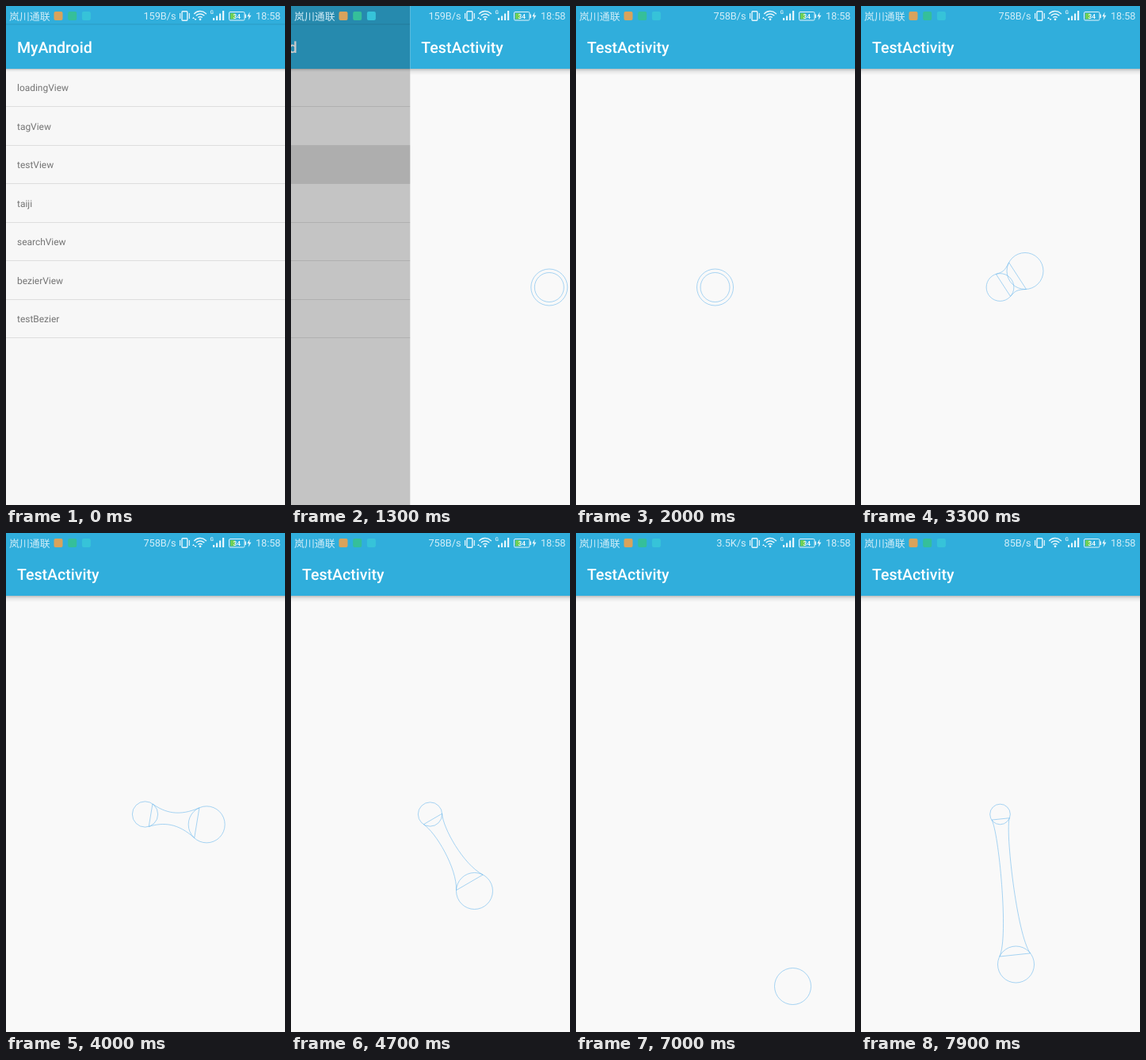
Write an HTML page with a canvas that moves like this. It is 352x628 px and loops after 8 s.

```html
<!DOCTYPE html>
<html lang="zh">
<head>
<meta charset="utf-8">
<title>Metaball drag</title>
<style>
  html, body { margin: 0; width: 100%; height: 100%; overflow: hidden; background: #f9f9f9; }
  canvas { display: block; width: 352px; height: 628px; }
</style>
</head>
<body>
<canvas id="stage"></canvas>
<script>
const W = 352, H = 628, LOOP = 8000, STEP = 100;
const canvas = document.getElementById('stage');
const ctx = canvas.getContext('2d');
const dpr = window.devicePixelRatio || 1;
canvas.width = W * dpr;
canvas.height = H * dpr;

const BLUE = '#30aedc', LINE = '#6db9ec', PALE = '#d3eef8', ICON = '#e6f6fc';
const SANS = 'Roboto, "Noto Sans", sans-serif';
const ITEMS = ['loadingView', 'tagView', 'testView', 'taiji', 'searchView', 'bezierView', 'testBezier'];
const ROW = 48.5, FIRST = 127;
const HOME = { x: 175.5, y: 354 }, BALL = 23, REACH = 220;

// Drag path: time, x, y
const PATH = [
  [2800, 175.5, 354], [3050, 187, 343], [3300, 207, 333.5], [3700, 245, 344],
  [4100, 252.5, 377], [4700, 231.5, 450.5], [5100, 241, 493], [5500, 270, 527],
  [6000, 302, 553], [6400, 308, 560], [7000, 273.5, 570.5], [7300, 241, 581],
  [7550, 217, 586], [7900, 195.5, 543]
];

function text(str, x, y, size, color, weight = 400, align = 'left', family = SANS) {
  ctx.font = `${weight} ${size}px ${family}`;
  ctx.textRendering = 'geometricPrecision';
  ctx.fillStyle = color;
  ctx.textAlign = align;
  ctx.fillText(str, x, y);
}

function box(x, y, w, h, color) {
  ctx.fillStyle = color;
  ctx.fillRect(x, y, w, h);
}

function roundBox(x, y, w, h, r) {
  ctx.beginPath();
  ctx.roundRect(x, y, w, h, r);
}

function ring(x, y, r) {
  ctx.beginPath();
  ctx.arc(x, y, r, 0, Math.PI * 2);
  ctx.stroke();
}

function polyline(points) {
  ctx.beginPath();
  points.forEach(([x, y]) => ctx.lineTo(x, y));
}

function header(title, depth) {
  box(0, 0, W, 79, BLUE);
  const shade = ctx.createLinearGradient(0, 79, 0, 79 + depth);
  shade.addColorStop(0, 'rgba(0,0,0,.24)');
  shade.addColorStop(0.4, 'rgba(0,0,0,.08)');
  shade.addColorStop(1, 'rgba(0,0,0,0)');
  box(0, 79, W, depth, shade);
  text(title, 14, 58.8, 19.55, '#fff', 500);
}

function listPage(t) {
  box(0, 0, W, H, '#f7f7f7');
  if (t >= 800) {
    const k = Math.min(1, (t - 700) / 400);
    ctx.save();
    ctx.beginPath();
    ctx.rect(0, FIRST + ROW, W, ROW);
    ctx.clip();
    box(0, FIRST + ROW, W, ROW, 'rgba(0,0,0,.04)');
    ctx.beginPath();
    ctx.arc(W / 2, FIRST + ROW * 1.5, 180 * k, 0, Math.PI * 2);
    ctx.fillStyle = 'rgba(0,0,0,.07)';
    ctx.fill();
    ctx.restore();
  }
  ITEMS.forEach((name, i) => {
    const y = FIRST + ROW * i;
    text(name, 14, y - 19.8, 11.95, '#747474');
    box(0, Math.round(y) - 1, W, 1, '#dedede');
  });
  header('MyAndroid', 4);
  box(0, 22, W, 2, 'rgba(0,0,0,.06)');
}

// Cubic Hermite through the drag path
function dragPoint(t) {
  if (t <= PATH[0][0]) return { ...HOME };
  let i = 0;
  while (i < PATH.length - 2 && t > PATH[i + 1][0]) i++;
  const a = PATH[i], b = PATH[i + 1], span = b[0] - a[0];
  const s = Math.min(1, (t - a[0]) / span);
  const slope = (j, c) => {
    const p = PATH[Math.max(0, j - 1)], q = PATH[Math.min(PATH.length - 1, j + 1)];
    return (q[c] - p[c]) / (q[0] - p[0]);
  };
  const at = c => {
    const s2 = s * s, s3 = s2 * s;
    return (2 * s3 - 3 * s2 + 1) * a[c] + (s3 - 2 * s2 + s) * span * slope(i, c)
         + (3 * s2 - 2 * s3) * b[c] + (s3 - s2) * span * slope(i + 1, c);
  };
  return { x: at(1), y: at(2) };
}

function neck(a, ra, b, rb, spread = 0.67, rate = 1.8) {
  const d = Math.hypot(b.x - a.x, b.y - a.y);
  if (d <= Math.abs(ra - rb)) return;
  let ua = 0, ub = 0;
  if (d < ra + rb) {
    ua = Math.acos((ra * ra + d * d - rb * rb) / (2 * ra * d));
    ub = Math.acos((rb * rb + d * d - ra * ra) / (2 * rb * d));
  }
  const dir = Math.atan2(b.y - a.y, b.x - a.x);
  const open = Math.acos((ra - rb) / d);
  const da = ua + (open - ua) * spread;
  const db = Math.PI - ub - (Math.PI - ub - open) * spread;
  const move = (p, ang, r) => ({ x: p.x + r * Math.cos(ang), y: p.y + r * Math.sin(ang) });
  const a1 = move(a, dir + da, ra), a2 = move(a, dir - da, ra);
  const b1 = move(b, dir + db, rb), b2 = move(b, dir - db, rb);
  const len = Math.min(spread * rate, Math.hypot(a1.x - b1.x, a1.y - b1.y) / (ra + rb))
            * Math.min(1, d * 2 / (ra + rb));
  const q = Math.PI / 2;
  const curve = (h1, h2, end) => ctx.bezierCurveTo(h1.x, h1.y, h2.x, h2.y, end.x, end.y);
  ctx.beginPath();
  ctx.moveTo(a1.x, a1.y);
  curve(move(a1, dir + da - q, ra * len), move(b1, dir + db + q, rb * len), b1);
  ctx.lineTo(b2.x, b2.y);
  curve(move(b2, dir - db - q, rb * len), move(a2, dir - da + q, ra * len), a2);
  ctx.closePath();
  ctx.stroke();
}

function testPage(t) {
  box(0, 0, W, H, '#f9f9f9');
  header('TestActivity', 8);
  const p = dragPoint(t);
  const d = Math.hypot(p.x - HOME.x, p.y - HOME.y);
  ctx.strokeStyle = LINE;
  ctx.lineWidth = 0.6;
  ring(p.x, p.y, BALL);
  if (d < REACH) {
    const r = 18.5 - 0.03 * d;
    ring(HOME.x, HOME.y, r);
    neck(HOME, r, p, BALL);
  }
}

function statusBar(t) {
  text('岚川通联', 4, 17.5, 12.9, PALE, 400, 'left', '"Noto Sans CJK SC", "Noto Sans CJK", sans-serif');
  ['#d9a35c', '#35bf9a', '#36c3d9'].forEach((color, i) => {
    roundBox(60.5 + i * 17.7, 7, 11, 11, 2);
    ctx.fillStyle = color;
    ctx.fill();
  });

  const speed = t < 2000 ? '159B/s' : t < 5000 ? '758B/s' : t < 7800 ? '3.5K/s' : '85B/s';
  text(speed, 214.5, 17.3, 12.7, PALE, 400, 'right');
  text('18:58', 346.5, 17.3, 12.7, PALE, 400, 'right');

  ctx.strokeStyle = ICON;
  ctx.lineWidth = 1.4;
  roundBox(222, 6.7, 6.8, 11.6, 1);
  ctx.stroke();
  box(219, 9, 1.2, 7, ICON);
  box(230.7, 9, 1.2, 7, ICON);

  // Wi-Fi fan
  ctx.lineWidth = 1.5;
  for (const r of [3.6, 7, 10.4]) {
    ctx.beginPath();
    ctx.arc(245, 17, r, -Math.PI * 0.77, -Math.PI * 0.23);
    ctx.stroke();
  }
  ctx.beginPath();
  ctx.arc(245, 16.8, 1.4, 0, Math.PI * 2);
  ctx.fill();
  const active = t < 6000 || (t >= 6800 && t < 7800);
  if (active) {
    polyline([[235, 16], [236.5, 13.8], [238, 16]]);
    ctx.fill();
    polyline([[237.5, 16], [240.5, 16], [239, 18.2]]);
    ctx.fill();
  }

  text('G', 257.5, 10, 6.5, ICON, 500);
  [3, 5.5, 8.5, 12].forEach((h, i) => box(261 + i * 4, 18 - h, 2.2, h, ICON));

  ctx.lineWidth = 1;
  roundBox(281.5, 7.5, 19.5, 10.5, 1.5);
  ctx.stroke();
  box(301.5, 10.5, 1.5, 4.5, ICON);
  box(283, 9, 6, 7.5, '#6fcf55');
  text('34', 291.3, 16, 8.3, '#fff', 500, 'center');
  polyline([[307.6, 7.5], [304.3, 13.3], [306.6, 13.3], [305.6, 18], [309.4, 11.7], [307, 11.7]]);
  ctx.fillStyle = ICON;
  ctx.fill();
}

function draw(t) {
  ctx.setTransform(dpr, 0, 0, dpr, 0, 0);
  const k = Math.max(0, Math.min(1, (t - 1125) / 505));
  const offset = W * (1 - k) ** 2;
  if (k < 1) {
    ctx.save();
    ctx.translate((offset - W) * 0.5, 0);
    listPage(t);
    ctx.restore();
    if (k > 0) box(0, 0, W, H, `rgba(0,0,0,${0.36 * (1 - offset / W)})`);
  }
  if (k > 0) {
    ctx.save();
    ctx.translate(offset, 0);
    testPage(t);
    ctx.restore();
  }
  statusBar(t);
}

const start = performance.now();
function tick() {
  const t = (performance.now() - start) % LOOP;
  draw(Math.floor(t / STEP) * STEP);
  requestAnimationFrame(tick);
}
tick();
</script>
</body>
</html>
```
